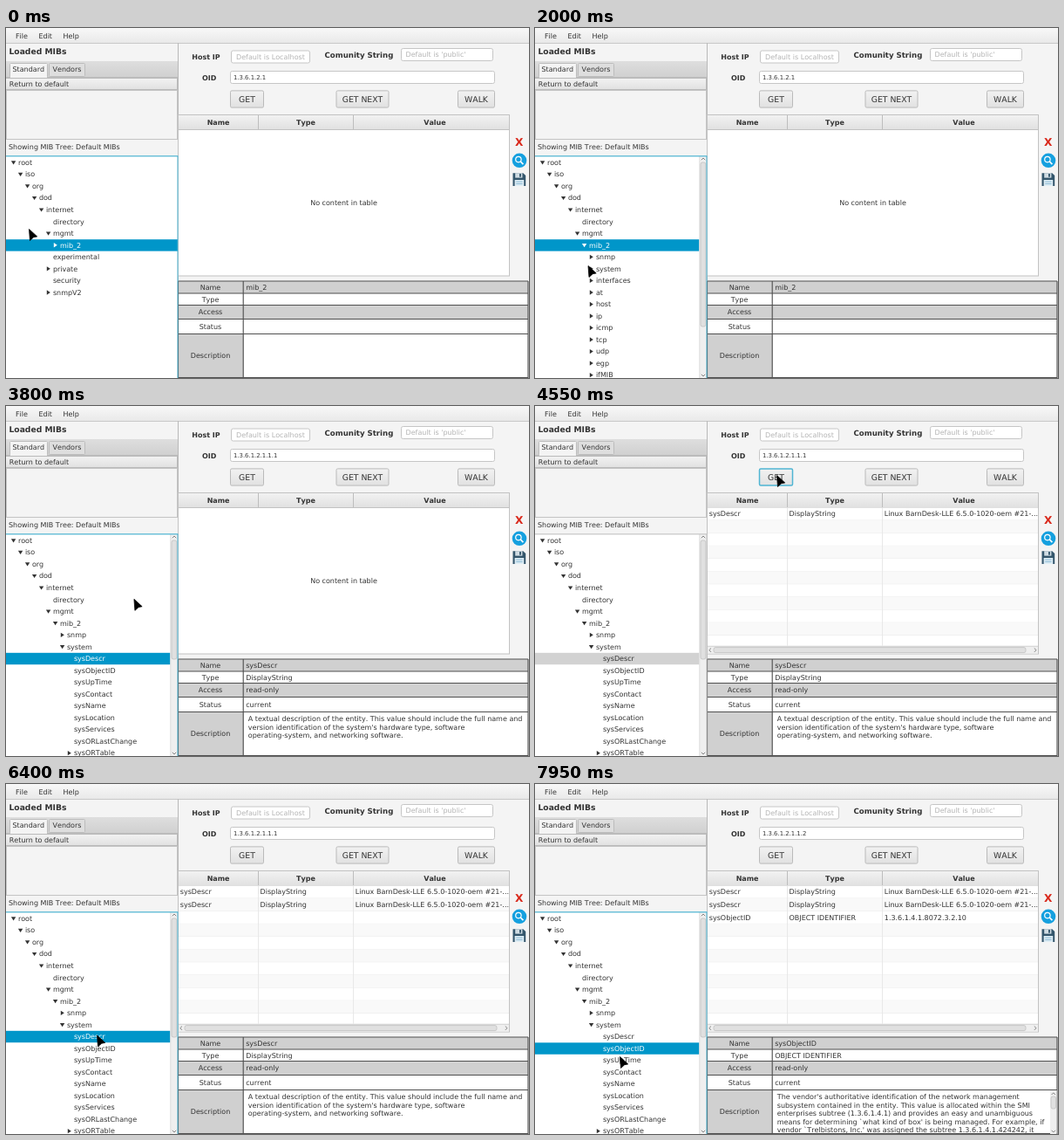
Write an HTML page that moves like this. It is 600 by 401 pixels and loops after 8000 ms.

```html
<!DOCTYPE html>
<html lang="en">
<head>
<meta charset="utf-8">
<title>MIB browser</title>
<style>
  html, body { margin: 0; width: 100%; height: 100%; overflow: hidden; background: #f4f4f4; }
  svg { display: block; width: 100vw; height: 100vh; }
  text {
    font: 8px "DejaVu Sans", Verdana, sans-serif; fill: #333; white-space: pre;
    text-rendering: geometricPrecision; font-kerning: none; font-variant-ligatures: none;
  }
  .b { font-weight: bold; }
  .mid { text-anchor: middle; }
  .hint { fill: #b4b4b4; }
  .oid { font-size: 6.88px; }
  .btn { font-size: 9.3px; text-anchor: middle; }
  .on { fill: #fff; }
</style>
</head>
<body>
<svg id="stage" viewBox="0 0 600 401" preserveAspectRatio="none">
  <defs>
    <linearGradient id="soft" x2="0" y2="1"><stop stop-color="#f2f2f2"/><stop offset="1" stop-color="#e1e1e1"/></linearGradient>
    <linearGradient id="bar" x2="0" y2="1"><stop stop-color="#f8f8f8"/><stop offset="1" stop-color="#e9e9e9"/></linearGradient>
    <linearGradient id="tabs" x2="0" y2="1"><stop stop-color="#dedede"/><stop offset="1" stop-color="#d0d0d0"/></linearGradient>
    <clipPath id="view"><rect x="0" y="147" width="197" height="254"/></clipPath>
    <clipPath id="note"><rect x="273" y="351" width="326" height="50"/></clipPath>
  </defs>
</svg>
<script>
const LOOP = 8000;
const T = { openMib: 1000, openSys: 2700, pick: 3350, get: 4400, back: 6100, again: 6300, pick2: 7350, row3: 7600 };
const BLUE = '#0096c9', LINE = '#bdbdbd';
const stage = document.getElementById('stage');
const layers = [];

const text = (x, y, s, cls = '') => `<text x="${x}" y="${y}" class="${cls}">${s}</text>`;
const rect = (x, y, w, h, fill, extra = '') => `<rect x="${x}" y="${y}" width="${w}" height="${h}" fill="${fill}" ${extra}/>`;
const box = (x, y, w, h, fill, stroke = LINE, r = 0, sw = 1) =>
  rect(x + .5, y + .5, w - 1, h - 1, fill, `stroke="${stroke}" stroke-width="${sw}" rx="${r}"`);
const shape = (d, fill) => `<path d="${d}" fill="${fill}"/>`;
const stroke = (d, color, w = 1) => `<path d="${d}" fill="none" stroke="${color}" stroke-width="${w}"/>`;
const thumb = (x, y, w, h) => rect(x, y, w, h, '#e0e0e0', 'rx="2" stroke="#bcbcbc" stroke-width=".7"');

// Adds a group, visible during [from, to)
function add(markup, from = 0, to = LOOP) {
  const g = document.createElementNS('http://www.w3.org/2000/svg', 'g');
  g.innerHTML = markup;
  stage.append(g);
  layers.push({ g, from, to });
  return g;
}

const field = (x, y, w, h) => box(x, y, w, h, '#fff', '#c6c6c6', 2);

const button = (x, w, label, focus) =>
  box(x, 71.4, w, 20.2, 'url(#soft)', focus ? '#4fb5d3' : '#bababa', 1.5, focus ? 1.5 : 1) +
  text(x + w / 2, 85, label, 'btn');

function frameParts() {
  return rect(0, 0, 600, 401, '#f4f4f4') +
    rect(0, 0, 600, 17, 'url(#bar)') + rect(0, 17, 600, 1, '#c8c8c8') +
    text(11, 11.8, 'File') + text(37.5, 11.8, 'Edit') + text(65.5, 11.8, 'Help') +
    `<text x="3.5" y="30.3" class="b" style="font-size:9.2px">Loaded MIBs</text>` +
    rect(0, 38, 197, 18, 'url(#tabs)') + rect(0, 56, 197, 1, '#bcbcbc') +
    box(4, 40, 44, 17, '#f4f4f4', '#bcbcbc', 1) + rect(5, 55, 42, 2, '#f4f4f4') +
    box(49, 40, 42, 16, '#dedede', '#bcbcbc', 1) +
    text(7.5, 50.3, 'Standard') + text(53.5, 50.3, 'Vendors') +
    box(-1, 57, 198, 14, 'url(#soft)', '#bababa') + text(3.8, 66.5, 'Return to default') +
    box(0, 71, 197, 57, '#f4f4f4', '#c4c4c4') + text(3, 138.7, 'Showing MIB Tree: Default MIBs') +
    rect(197, 17, 1, 384, '#b9b9b9') +
    text(213.3, 36, 'Host IP', 'b') + field(258, 25.5, 91, 15) + text(264, 36, 'Default is Localhost', 'hint') +
    `<text x="365.5" y="33.8" class="b" style="font-size:8.6px">Comunity String</text>` +
    field(453, 23, 106, 15) + text(458.5, 33.4, "Default is 'public'", 'hint') +
    text(225, 60.2, 'OID', 'b') + field(257, 49, 304, 15) +
    button(378.5, 61, 'GET NEXT') + button(518, 43, 'WALK');
}

function icons() {
  return `<text x="588.6" y="134.800" class="b mid" style="font-size:12.2px;fill:#d9291c">X</text>` +
    `<circle cx="589" cy="151.8" r="8.3" fill="#15a0df"/><circle cx="587.9" cy="150.6" r="3.2" fill="none" stroke="#fff" stroke-width="1.2"/>` +
    stroke('M590.3 153L593.4 156.2', '#fff', 1.7) +
    shape('M581.500 166.200H593.300L596.200 169V181H581.500Z', '#34566c') +
    rect(584.2, 166.2, 8.2, 5.4, '#cfdbe2') + rect(589, 167, 1.9, 3.6, '#34566c') +
    rect(583.6, 174, 10.6, 7, '#dcebf3') + rect(585.2, 175.7, 7.4, .8, '#7fb2d0') + rect(585.2, 178, 7.4, .8, '#7fb2d0');
}

// Result table
const tableHead = () =>
  box(197, 99, 381, 185.5, '#fff', '#c2c2c2') + rect(198, 100, 379, 16, 'url(#soft)') +
  rect(198, 116, 379, 1, '#c2c2c2') + rect(289, 100, 1, 16, LINE) + rect(398, 100, 1, 16, LINE) +
  [[243.6, 'Name'], [344, 'Type'], [492, 'Value']].map(([x, s]) => text(x, 111.2, s, 'b mid')).join('');

function tableGrid() {
  let out = '';
  for (let i = 0; i < 11; i++) {
    const y = 116.5 + i * 14.65, h = Math.min(14.65, 275 - y);
    out += rect(198, y, 379, h, i % 2 ? '#f9f9f9' : '#fff') + rect(198, y + h - .6, 379, .7, '#ebebeb');
  }
  return out + rect(289, 117, 1, 158, '#e8e8e8') + rect(398, 117, 1, 158, '#e8e8e8') +
    rect(198, 275, 379, 8.5, '#efefef') + rect(198, 275, 379, .8, '#d2d2d2') + thumb(205, 276.6, 358, 6) +
    stroke('M202 277.500L199.800 279.700L202 281.900M572.800 277.500L575 279.700L572.800 281.900', '#777', .9);
}

const tableRow = (i, cells) =>
  cells.map((s, c) => text([199.8, 291.5, 400.8][c], 126.2 + i * 14.65, s)).join('');

// Detail panel
const edges = [290, 304, 317.5, 333.5, 350.5, 400.6];
function detailGrid() {
  let out = '';
  ['Name', 'Type', 'Access', 'Status', 'Description'].forEach((s, i) => {
    const y = edges[i], h = edges[i + 1] - y;
    out += rect(197.5, y, 401.5, h, i % 2 ? '#fff' : '#d0d0d0') + text(234.5, y + h / 2 + 2.9, s, 'mid');
  });
  out += rect(272.5, 350.5, 326.5, 50.5, '#fff');
  return out + stroke(edges.map(y => `M197.500 ${y}H599`).join('') +
    'M197.500 290V401M272.200 290V401M599 290V401', '#505050', 1.15);
}

const details = (vals, lines) =>
  vals.map((s, i) => text(275.2, (edges[i] + edges[i + 1]) / 2 + 2.9, s)).join('') +
  `<g clip-path="url(#note)">${lines.map((s, i) => text(277.8, 360.9 + i * 9.6, s)).join('')}</g>`;

const noteScroll = () =>
  rect(591, 351, 7.5, 50, '#efefef') + thumb(592, 358, 5.5, 14) +
  stroke('M592.600 356L594.750 353.800L596.900 356M592.600 396.800L594.750 399L596.900 396.800', '#777', .9);

// Tree rows: depth, label, state (1 open, 0 closed, none for a leaf)
const trunk = [[0, 'root', 1], [1, 'iso', 1], [2, 'org', 1], [3, 'dod', 1], [4, 'internet', 1], [5, 'directory'], [5, 'mgmt', 1]];
const start = [...trunk, [6, 'mib_2', 0], [5, 'experimental'], [5, 'private', 0], [5, 'security'], [5, 'snmpV2', 0]];
const groups = 'snmp system interfaces at host ip icmp tcp udp egp ifMIB'.split(' ').map(s => [7, s, 0]);
const mib = [...trunk, [6, 'mib_2', 1], ...groups];
const leaves = 'Descr ObjectID UpTime Contact Name Location Services ORLastChange'.split(' ').map(s => [8, 'sys' + s]);
const system = [...trunk, [6, 'mib_2', 1], [7, 'snmp', 0], [7, 'system', 1], ...leaves, [8, 'sysORTable', 0]];

function tree(rows, sel, focus, thumbEnd) {
  const w = thumbEnd ? 188.5 : 197;
  let out = rect(0, 147, 197, 254, '#fff');
  rows.forEach(([depth, label, open], i) => {
    const y = 154.1 + i * 13.53, x = 8.6 + depth * 8, hot = i === sel;
    const lit = hot && focus, ink = lit ? '#fff' : '#333';
    if (hot) out += rect(0, y - 6.6, w, 13.4, focus ? BLUE : '#d2d2d2');
    if (open === 1) out += shape(`M${x - 2.7} ${y - 1.8}h5.400l-2.700 4.200Z`, ink);
    if (open === 0) out += shape(`M${x - 1.8} ${y - 2.7}v5.400l4 -2.700Z`, ink);
    out += text(x + 5.3, y + 2.8, label, lit ? 'on' : '');
  });
  if (thumbEnd) out += rect(188.5, 147, 8.5, 254, '#efefef') + rect(188.5, 147, .7, 254, '#d6d6d6') +
    thumb(190, 154, 5.8, thumbEnd - 154) +
    stroke('M190.800 151.200L193 149L195.200 151.200M190.800 396.800L193 399L195.200 396.800', '#777', .9);
  const edge = focus ? '#4db3d2' : '#c6c6c6';
  return `<g clip-path="url(#view)">${out}</g>` + rect(0, 146.2, 197.5, 1.2, edge) + rect(196.5, 147, 1, 254, edge);
}

add(frameParts() + icons() + tableHead() + detailGrid());
add(button(257, 39, 'GET'), 0, T.get);
add(button(257, 39, 'GET', true), T.get, T.back);
add(button(257, 39, 'GET'), T.back);
const oid = s => text(261, 59.2, s, 'oid');
add(oid('1.3.6.1.2.1') + details(['mib_2'], []), 0, T.pick);
add(oid('1.3.6.1.2.1.1.1') + details(['sysDescr', 'DisplayString', 'read-only', 'current'], [
  'A textual description of the entity. This value should include the full name and',
  "version identification of the system's hardware type, software",
  'operating-system, and networking software.']), T.pick, T.pick2);
add(oid('1.3.6.1.2.1.1.2') + details(['sysObjectID', 'OBJECT IDENTIFIER', 'read-only', 'current'], [
  "The vendor's authoritative identification of the network management",
  'subsystem contained in the entity. This value is allocated within the SMI',
  'enterprises subtree (1.3.6.1.4.1) and provides an easy and unambiguous',
  "means for determining `what kind of box' is being managed. For example, if",
  "vendor `Trelbistons, Inc.' was assigned the subtree 1.3.6.1.4.1.424242, it"]) + noteScroll(), T.pick2);

add(text(387.5, 203, 'No content in table', 'mid'), 0, T.get);
const descr = ['sysDescr', 'DisplayString', 'Linux BarnDesk-LLE 6.5.0-1020-oem #21-...'];
add(tableGrid() + tableRow(0, descr), T.get);
add(tableRow(1, descr), T.again);
add(tableRow(2, ['sysObjectID', 'OBJECT IDENTIFIER', '1.3.6.1.4.1.8072.3.2.10']), T.row3);

add(tree(start, 7, true), 0, T.openMib);
add(tree(mib, 7, true, 342), T.openMib, T.openSys);
add(tree(system, 7, true, 290), T.openSys, T.pick);
add(tree(system, 10, true, 290), T.pick, T.get);
add(tree(system, 10, false, 290), T.get, T.back);
add(tree(system, 10, true, 290), T.back, T.pick2);
add(tree(system, 11, true, 290), T.pick2);

const pointer = add('<path d="M0 0L9.200 8.400L5.200 9.200L1 13Z" fill="#000" stroke="#000" stroke-width=".8" stroke-linejoin="round"/>');

// Pointer stops: time, x, y
const path = [
  [0, 26.5, 230.5], [50, 26.5, 230.5], [400, 64, 248], [550, 64, 248], [750, 55, 248.5],
  [1450, 55, 248.5], [1850, 61, 272.5], [2050, 61, 272.5], [2250, 64, 275], [2400, 64, 275], [2450, 65, 275.5],
  [2800, 65, 275.5], [3050, 83.5, 287], [3200, 86, 287.5], [3500, 86, 287.5], [4300, 277.5, 79.5],
  [4750, 277.5, 79.5], [5750, 104.5, 288], [6500, 104.5, 288], [6850, 98.5, 301.5],
  [7700, 98.5, 301.5], [7950, 97.5, 312.5], [LOOP, 97.5, 312.5]
];

function pointerAt(t) {
  const i = path.findIndex(p => p[0] > t);
  const [t0, x0, y0] = path[i - 1], [t1, x1, y1] = path[i];
  const u = (t - t0) / (t1 - t0), e = u * u * (3 - 2 * u);
  return [x0 + (x1 - x0) * e, y0 + (y1 - y0) * e];
}

const origin = performance.now();
function draw() {
  const t = Math.max(0, performance.now() - origin) % LOOP;
  for (const { g, from, to } of layers) g.style.display = t >= from && t < to ? '' : 'none';
  pointer.setAttribute('transform', `translate(${pointerAt(t)})`);
  requestAnimationFrame(draw);
}
draw();
</script>
</body>
</html>
```
